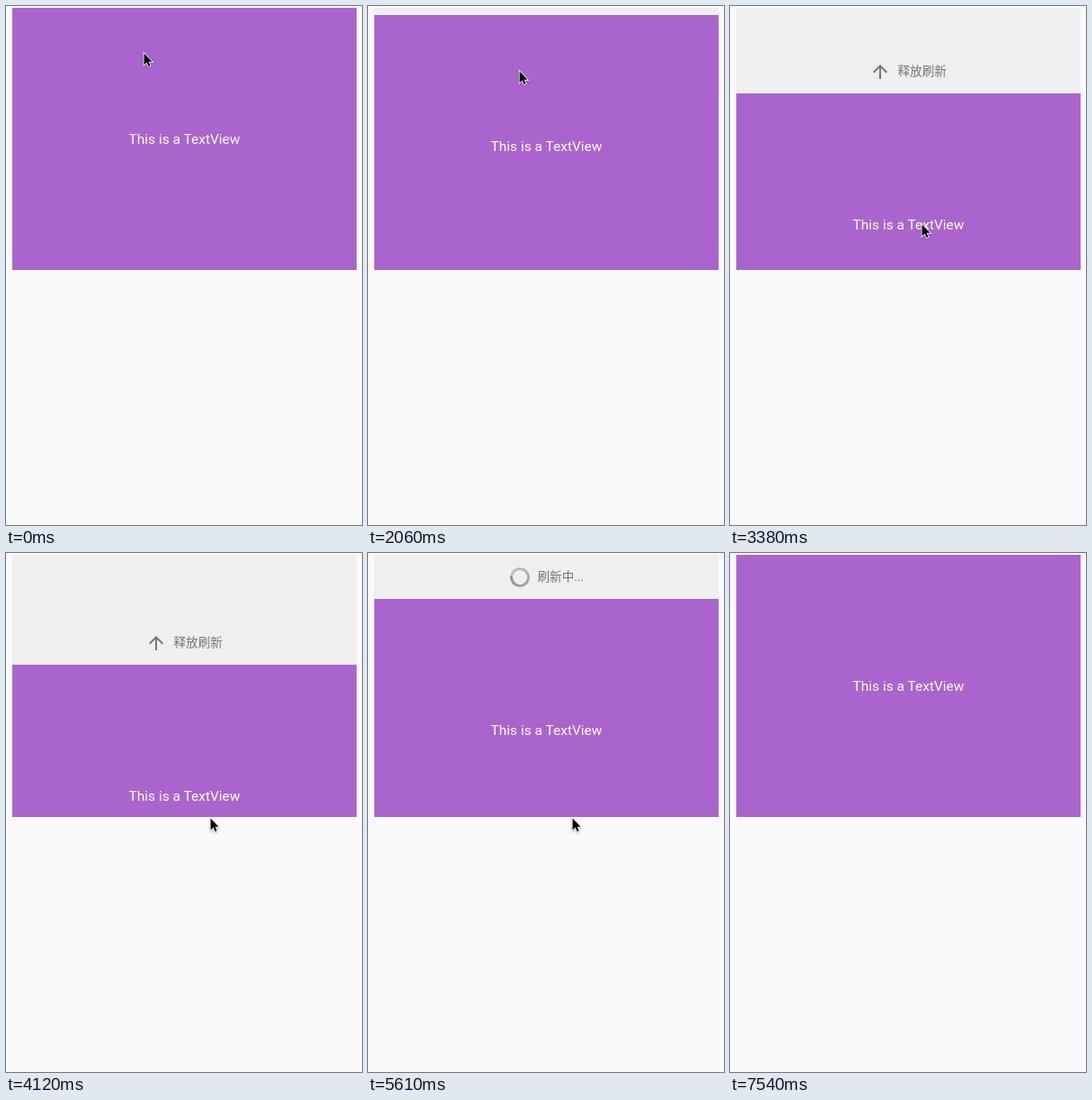
An HTML page for the animation above (8110 ms loop, 396 by 576 pixels).

```html
<!DOCTYPE html>
<html lang="zh-CN">
<head>
<meta charset="utf-8">
<title>Pull to refresh</title>
<style>
  html, body { margin: 0; width: 100%; height: 100%; overflow: hidden; background: #fafafa; }
  #stage { position: relative; width: 396px; height: 576px; overflow: hidden; }
  #panel { position: absolute; left: 7px; top: 2px; width: 383px; height: 291px; overflow: hidden; background: #efefef; }
  #sheet { position: absolute; left: 0; top: 0; width: 383px; height: 291px; background: #a965cd; }
  #caption { position: absolute; left: 0; top: 136px; width: 383px; text-align: center;
    font: 15.5px/20px Roboto, sans-serif; color: #fff; }
  #header { position: absolute; left: 0; top: -49px; width: 383px; height: 49px; color: #757575; }
  #label { position: absolute; top: 14px; white-space: nowrap;
    font: 13.6px/20px Roboto, "Noto Sans CJK SC", "Noto Sans CJK", sans-serif; }
  #arrow { position: absolute; left: 148px; top: 13px; width: 24px; height: 24px; }
  #spinner { position: absolute; left: 151px; top: 13.5px; width: 22px; height: 22px; border-radius: 50%;
    background: conic-gradient(#c2c2c2, #8f8f8f);
    -webkit-mask: radial-gradient(circle, transparent 7.6px, #000 8.2px);
    mask: radial-gradient(circle, transparent 7.6px, #000 8.2px); }
  #cursor { position: absolute; left: -2px; top: -2px; width: 17px; height: 22px;
    filter: drop-shadow(0 1px 1px rgba(0, 0, 0, .3)); }
</style>
</head>
<body>
<div id="stage">
  <div id="panel">
    <div id="sheet">
      <div id="header">
        <svg id="arrow" viewBox="0 0 24 24"><path fill="currentColor" d="M20 12l-1.41-1.41L13 16.17V4h-2v12.17l-5.58-5.59L4 12l8 8z"/></svg>
        <div id="spinner"></div>
        <div id="label"></div>
      </div>
      <div id="caption">This is a TextView</div>
    </div>
  </div>
  <svg id="cursor" viewBox="-3 -3 20 26">
    <path d="M0 0V15.2L3.6 11.9L6 17.3L8.3 16.3L6 11H10.6Z" fill="#000" stroke="#fff" stroke-width="2" paint-order="stroke"/>
  </svg>
</div>
<script>
const LOOP = 8110, TICKS = 55, TICK = LOOP / TICKS;
const RELEASE = 33, HEADER = 49, MAX_PULL = 122;
const DRAG_START_Y = 53, DRAG_END_Y = 294;

// Cursor stops, with an eased move from each to the next.
const stops = [
  { tick: 0, x: 153, y: 52 },
  { tick: 2, x: 163, y: 40 },
  { tick: 10.3, x: 163, y: 40 },
  { tick: 17, x: 172, y: 95 },
  { tick: 26, x: 227, y: DRAG_END_Y },
  { tick: 39, x: 227, y: DRAG_END_Y },
  { tick: 47.8, x: 347, y: 516 },
  { tick: 49.5, x: 362, y: 600 },
];

// Eased progress from 0 to 1 between two ticks.
function progress(tick, from, to) {
  const u = Math.min(1, Math.max(0, (tick - from) / (to - from)));
  return u * u * (3 - 2 * u);
}

function cursorAt(tick) {
  let { x, y } = stops[0];
  for (let i = 1; i < stops.length; i++) {
    const from = stops[i - 1], to = stops[i], k = progress(tick, from.tick, to.tick);
    x += (to.x - from.x) * k;
    y += (to.y - from.y) * k;
  }
  return { x, y };
}

function pullAt(tick, cursorY) {
  if (tick >= RELEASE) {
    const settle = (MAX_PULL - HEADER) * (1 - progress(tick, 32, 35));
    return settle + HEADER * (1 - progress(tick, 47, 50.5));
  }
  if (tick < stops[2].tick) return 0;
  const dragged = Math.max(0, cursorY - DRAG_START_Y) / (DRAG_END_Y - DRAG_START_Y);
  return MAX_PULL * dragged ** 1.06;
}

const [sheet, label, arrow, spinner, cursor] =
  ['sheet', 'label', 'arrow', 'spinner', 'cursor'].map(id => document.getElementById(id));
const move = (node, x, y) => node.style.transform = `translate(${Math.round(x)}px, ${Math.round(y)}px)`;
const turn = (node, degrees) => node.style.transform = `rotate(${degrees}deg)`;

function draw() {
  // The picture advances in steps, about seven a second.
  const time = performance.now() % LOOP;
  const tick = Math.min(TICKS - 1, Math.floor((time + 14) / TICK));
  const { x, y } = cursorAt(tick);
  const pull = pullAt(tick, y);
  const loading = tick >= RELEASE;

  move(sheet, 0, pull);
  move(cursor, x, y);
  label.textContent = loading ? '刷新中...' : pull > HEADER ? '释放刷新' : '下拉刷新';
  label.style.left = loading ? '181.5px' : '179.5px';
  arrow.style.display = loading ? 'none' : 'block';
  spinner.style.display = loading ? 'block' : 'none';
  turn(arrow, 180 * progress(tick, 20.5, 22.5));
  turn(spinner, (tick - 46) * 55);
  requestAnimationFrame(draw);
}
draw();
</script>
</body>
</html>
```
